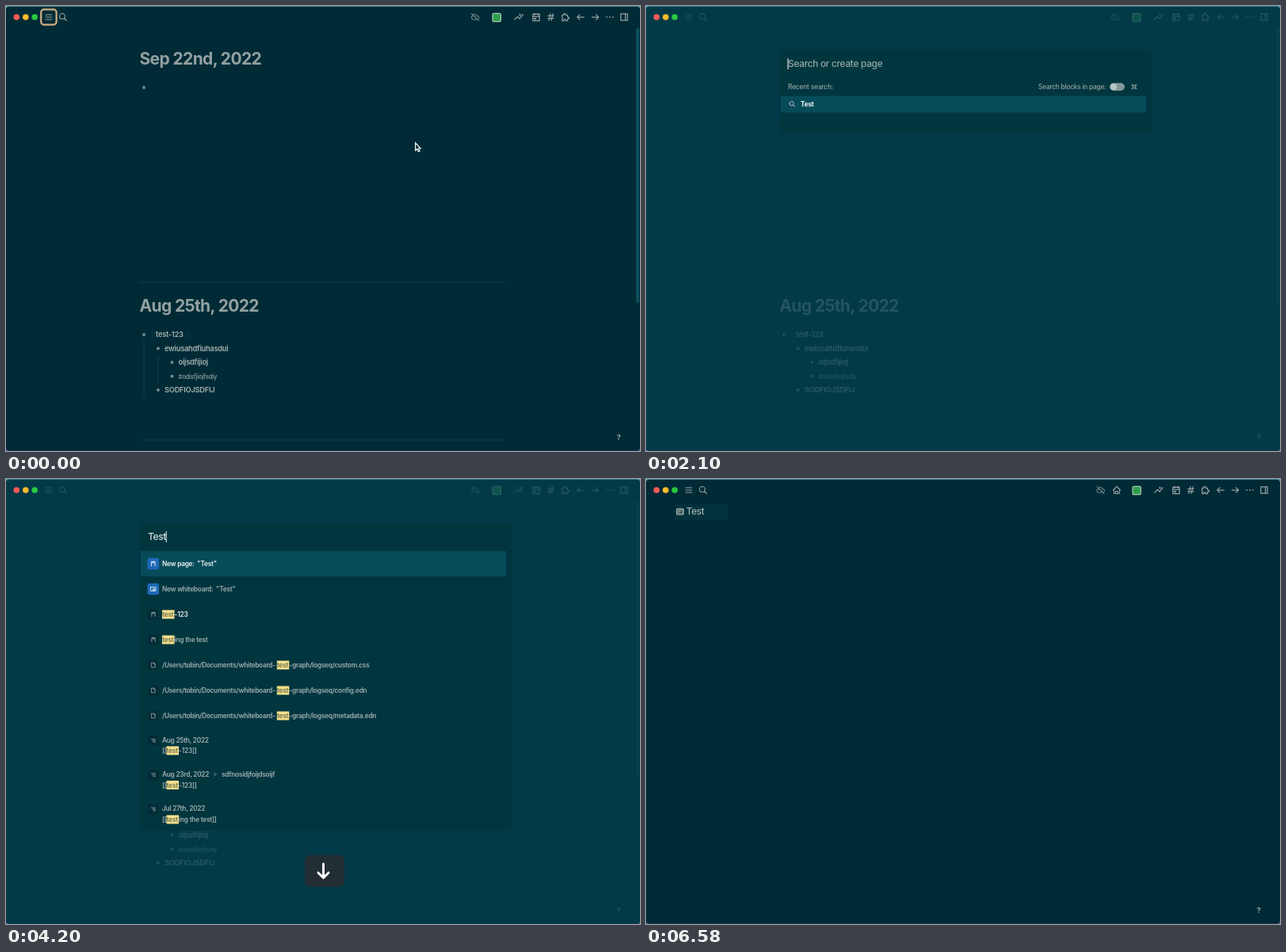
These frames come from a looping animation (800 by 562 pixels, 6.65 s). An HTML page:

```html
<!DOCTYPE html>
<html lang="en">
<head>
<meta charset="utf-8">
<title>Create a whiteboard from search</title>
<style>
html, body { margin: 0; width: 100%; height: 100%; overflow: hidden; background: #002b36; }
svg { display: block; width: 100vw; height: 100vh; }
text { font-family: Inter, sans-serif; letter-spacing: -.03em; white-space: pre; }
</style>
</head>
<body>
<svg id="stage" viewBox="0 0 800 562" preserveAspectRatio="none">
  <defs>
    <linearGradient id="desk" x1="0" y1="0" x2="0" y2="1">
      <stop offset="0" stop-color="#4f9db2"/><stop offset=".5" stop-color="#2a6a80"/><stop offset="1" stop-color="#6a5aa8"/>
    </linearGradient>
  </defs>
  <rect width="800" height="562" fill="url(#desk)"/>
  <rect y=".7" width="800" height="561" rx="4" fill="#002b36"/>
  <g id="journal"></g>
  <g id="board"></g>
  <g id="bar"></g>
  <rect id="veil" y=".7" width="800" height="561" rx="4" fill="#053f4d"/>
  <g id="lights"></g>
  <g id="modal">
    <rect id="panel" x="169" y="55" width="469" rx="4" fill="#01363f"/>
    <rect id="pick" x="170" width="461" fill="#064b59"/>
    <g id="recent"></g>
    <g id="results"></g>
    <text id="query" x="179" y="77" font-size="12" font-weight="550"></text>
    <rect id="caret" y="66" width="1.1" height="14" fill="#e6eeee"/>
  </g>
  <g id="keys"></g>
  <path id="mouse" d="M516.600 172.900v9.600l2.200-1.900 1.500 3.300 1.700-.7-1.500-3.200h2.700z" fill="#0b2a33" stroke="#f2f5f5" stroke-width="1.200"/>
</svg>
<script>
const LOOP = 6650, STEP = 70;
const $ = id => document.getElementById(id);
const GREY = '#93a1a1';

// Icon outlines on a 24 unit grid
const ICONS = {
  menu: 'M4 6h16M4 12h16M4 18h16',
  search: 'M3 10a7 7 0 1 0 14 0a7 7 0 1 0-14 0M21 21l-6-6',
  cloud: 'M9.6 5.2a7 7 0 0 1 8 4.8h1a3.5 3.5 0 0 1 2.4 6M18 18H7a4.5 4.5 0 0 1-1-8.8c.3-1 .8-1.8 1.5-2.4M3 3l18 18',
  home: 'M5 12H3l9-9 9 9h-2M5 12v7a2 2 0 0 0 2 2h10a2 2 0 0 0 2-2v-7M9 21v-6h6v6',
  trend: 'M2 18l7-7 5 5 8-10M2 18h.1M9 11h.1M14 16h.1M22 6h.1M15 5v3M13.5 6.5h3',
  calendar: 'M4 5h16v16H4zM16 3v4M8 3v4M4 11h16M8 15h3v2H8z',
  hash: 'M5 9h14M5 15h14M11 4L7 20M17 4l-4 16',
  puzzle: 'M4 7h3a1 1 0 0 0 1-1V5a2 2 0 0 1 4 0v1a1 1 0 0 0 1 1h3a1 1 0 0 1 1 1v3a1 1 0 0 0 1 1h1a2 2 0 0 1 0 4h-1a1 1 0 0 0-1 1v3a1 1 0 0 1-1 1h-3a1 1 0 0 1-1-1v-1a2 2 0 0 0-4 0v1a1 1 0 0 1-1 1H4z',
  left: 'M4 12h16M4 12l6 6M4 12l6-6',
  right: 'M4 12h16M20 12l-6 6M20 12l-6-6',
  dots: 'M4 12h1M11.5 12h1M19 12h1',
  sidebar: 'M4 4h16v16H4zM15 4v16',
  command: 'M7 9a2 2 0 1 1 2-2v10a2 2 0 1 1-2-2h10a2 2 0 1 1-2 2V7a2 2 0 1 1 2 2H7',
  down: 'M12 4v16M18 14l-6 6M6 14l6 6',
  enter: 'M20 5v5a3 3 0 0 1-3 3H4M9 18l-5-5 5-5',
  file: 'M5 3h9l5 5v13H5zM14 3v5h5',
  page: 'M5 20V4h14v16M9 4v5h6V4',
  block: 'M4 6h16M8 12h12M12 18h8',
  board: 'M3 5h18v14H3zM12 12h6v4h-6z'
};

const icon = (name, x, y, size = 12, color = GREY, width = 2.2) =>
  `<path d="${ICONS[name]}" transform="translate(${x - size / 2} ${y - size / 2}) scale(${size / 24})" ` +
  `fill="none" stroke="${color}" stroke-width="${width}" stroke-linecap="round" stroke-linejoin="round"/>`;
const text = (s, x, y, size, weight = 550, color = GREY, extra = '') =>
  `<text x="${x}" y="${y}" font-size="${size}" font-weight="${weight}" fill="${color}" ${extra}>${s}</text>`;
const rect = (x, y, w, h, fill, rx = 0, extra = '') =>
  `<rect x="${x}" y="${y}" width="${w}" height="${h}" rx="${rx}" fill="${fill}" ${extra}/>`;
const dot = (x, y, r, fill) => `<circle cx="${x}" cy="${y}" r="${r}" fill="${fill}"/>`;

function drawJournal() {
  const items = [[174, 415, 'test-123', 189, 9.3], [192, 432.5, 'ewiusahdfiuhasdui', 200, 9.3],
    [209.5, 450, 'oijsdfijioj', 217.5, 9.3], [209.5, 467.5, '#odisfjiojfsdiy', 217.5, 7.6],
    [192, 485, 'SODFIOJSDFIJ', 200, 9.3]];
  $('journal').innerHTML =
    text('Sep 22nd, 2022', 168.5, 73.5, 21, 700) + dot(174, 103, 1.9, '#78908f') +
    text('Aug 25th, 2022', 168.5, 386, 21, 700) +
    [349, 548].map(y => rect(169, y - .4, 461, .8, '#17454f')).join('') +
    rect(173.6, 424, .8, 70, '#0b4b58') + rect(191.6, 441, .8, 35, '#0b4b58') +
    items.map(([bx, y, s, x, size]) => dot(bx, y, 1.9, '#78908f') +
      text(s, x, y + 3.3, size, 600, size < 9 ? '#7d9295' : '#a3b0b0')).join('') +
    text('[[', 183, 418.3, 9.3, 400, '#123f49') + text(']]', 226, 418.3, 9.3, 400, '#123f49') +
    rect(795, 28, 4, 347, '#0d4f5c', 2);
}

function drawBoard() {
  $('board').innerHTML = rect(36, 32, 67, 20, '#03313c', 2) +
    rect(38, 37, 10, 8.5, '#93a1a1', 2) + icon('board', 43, 41.2, 7, '#0b3540', 2.5) +
    text('Test', 50.800, 45, 11.8, 550, '#a3b0b0') + icon('home', 594, 14);
}

function drawBar() {
  const tools = { trend: 647, calendar: 669, hash: 687.5, puzzle: 706, left: 725, right: 743.5, dots: 762, sidebar: 780 };
  $('bar').innerHTML = icon('menu', 54, 14) + icon('search', 72, 14) +
    `<g id="cloud">${icon('cloud', 592, 14, 12, '#6f878a')}</g>` +
    rect(614, 9.3, 10.4, 10.4, '#2f9e4c', 2, 'stroke="#a9c9ae" stroke-width="1.2"') +
    Object.entries(tools).map(([n, x]) => icon(n, x, 14, 12.5, GREY, n === 'dots' ? 3.2 : 2.4)).join('') +
    text('?', 773, 547.5, 9.5, 700, GREY, 'text-anchor="middle"') +
    rect(44.2, 4.4, 19.4, 19.2, 'none', 3.5, 'id="ring" stroke="#cfae80" stroke-width="2.2"');
  $('lights').innerHTML = dot(13.3, 14, 3.8, '#fb5b57') + dot(24.8, 14, 3.8, '#fbbb2d') + dot(36.2, 14, 3.8, '#29c840');
}

function drawRecent() {
  $('recent').innerHTML = text('Recent search:', 179, 104.8, 8.5) +
    text('Search blocks in page:', 580.5, 104.8, 8.4, 550, GREY, 'text-anchor="end"') +
    rect(585, 97.2, 19, 9.8, '#82989b', 4.9) + dot(590.2, 102.1, 4, '#b9c6c7') +
    icon('command', 616, 102, 10.5, GREY, 2) +
    icon('search', 184.5, 124, 9, '#b7c4c6', 2.6) + text('Test', 195, 127.1, 8.4, 700, '#f0f5f5');
}

// One result line: plain text with the matched word marked
function match(before, after, x, markX, y, color = '#a0aeb0') {
  return (before && text(before, x, y + 3.1, 8.3, 600, color)) +
    rect(markX, y - 5.5, 15.5, 11, '#f5e08c') + text('test', markX + .3, y + 3.1, 8.3, 500, '#59614a') +
    text(after, markX + 15.6, y + 3.1, 8.3, 600, color);
}

function drawResults() {
  const tile = (name, y) => rect(179.5, y - 6.5, 13, 13, '#042c36', 2.5) + icon(name, 186, y, 7.5, '#a0aeb0', 2.5);
  const fresh = (name, s, y, id) => rect(178.5, y - 7.3, 14.6, 14.6, '#1f69b8', 3) +
    icon(name, 185.8, y, 8, '#e6f0fa', 2.8) + text(s, 197, y + 3.1, 8.3, 600, GREY, `id="${id}"`);
  const path = '/Users/tobin/Documents/whiteboard-';
  const files = ['custom.css', 'config.edn', 'metadata.edn'];
  const date = (s, y) => tile('block', y + 1) + text(s, 197, y + 3.1, 8.3, 600, '#a0aeb0');
  $('results').innerHTML =
    fresh('page', 'New page:&#160; "Test"', 107, 'rowPage') + fresh('board', 'New whiteboard:&#160; "Test"', 139, 'rowBoard') +
    tile('page', 171) + match('', '-123', 197, 197, 171, '#e8eeee') +
    tile('page', 203) + match('', 'ing the test', 197, 197, 203) +
    files.map((f, i) => tile('file', 235 + 32 * i) +
      match(path, '-graph/logseq/' + f, 197, 341.8, 235 + 32 * i)).join('') +
    date('Aug 25th, 2022', 329.5) + match('[[', '-123]]', 197, 202.5, 343) +
    date('Aug 23rd, 2022', 372.8) + text('&gt;', 261.5, 375.6, 7.5, 500, '#7d9295') +
    text('sdfnosidjfoijdsoijf', 272, 375.9, 8.3, 600, '#a0aeb0') + match('[[', '-123]]', 197, 202.5, 386.5) +
    date('Jul 27th, 2022', 416) + match('[[', 'ing the test]]', 197, 202.5, 430);
}

function drawKeys() {
  const cap = (id, x, w, fill, inner) => `<g id="${id}">${rect(x, 475, w, 40, fill, 7)}${inner}</g>`;
  $('keys').innerHTML =
    cap('keyK', 367, 68, '#202b37', icon('command', 392, 495, 27, '#fff', 2.5) + text('K', 403.5, 504, 25, 600, '#fff')) +
    cap('keyDown', 377, 50, '#232d34', icon('down', 400.5, 495, 26, '#fff', 2.7)) +
    cap('keyEnter', 373, 55, '#232d34', icon('enter', 400.5, 494.5, 29, '#fff', 2.4));
}

const OPEN = 490, HIDE = 2100, RESULTS = 3290, DOWN = 4200, MOVE = 4270, ENTER = 5040, LEAVE = 6160;
const TYPED = [2240, 2450, 2590, 2800];
const clamp = v => Math.max(0, Math.min(1, v));
const easeOut = v => 1 - (1 - v) ** 2;
const set = (id, attrs) => { for (const k in attrs) $(id).setAttribute(k, attrs[k]); };
const show = (id, on) => set(id, { opacity: +on });
let caretAt = [];

function render(t) {
  const left = t >= LEAVE;
  const fade = easeOut(clamp((t - OPEN + STEP) / 280)) * (1 - clamp((t - LEAVE + STEP) / 280));
  const typed = TYPED.filter(k => t >= k).length;
  const found = t >= RESULTS, moved = t >= MOVE;

  show('journal', !left);
  show('board', left);
  set('cloud', { transform: `translate(${left ? -18.5 : 0} 0)` });
  show('ring', t < OPEN);
  set('veil', { opacity: .78 * fade });
  set('modal', { opacity: fade });
  set('panel', { height: found ? 389 : 106 });
  set('pick', found ? { y: moved ? 123 : 91, height: 32 } : { y: 113.7, height: 20.8 });
  show('recent', !found);
  show('results', found);
  set('rowPage', { fill: moved ? '#a0aeb0' : '#eef4f4' });
  set('rowBoard', { fill: moved ? '#eef4f4' : '#a0aeb0' });
  $('query').textContent = typed ? 'Test'.slice(0, typed) : 'Search or create page';
  set('query', { fill: typed ? '#dbe3e3' : '#93a5a7' });
  set('caret', { x: caretAt[typed] });
  show('mouse', t < HIDE);

  const out = start => 1 - clamp((t - start) / 300);
  show('keyK', t >= OPEN ? out(1400) : 0);
  show('keyDown', t >= DOWN && t < ENTER);
  show('keyEnter', t >= ENTER ? out(LEAVE - STEP) : 0);
}

function measure() {
  caretAt = [0, 1, 2, 3, 4].map(n => {
    $('query').textContent = 'Test'.slice(0, n);
    return 178.6 + (n ? $('query').getComputedTextLength() : 0);
  });
}

drawJournal(); drawBoard(); drawBar(); drawRecent(); drawResults(); drawKeys();
measure();
const start = performance.now();
function tick() {
  const t = (performance.now() - start) % LOOP;
  render(Math.floor(t / STEP) * STEP);
  requestAnimationFrame(tick);
}
render(0);
requestAnimationFrame(tick);
</script>
</body>
</html>
```
